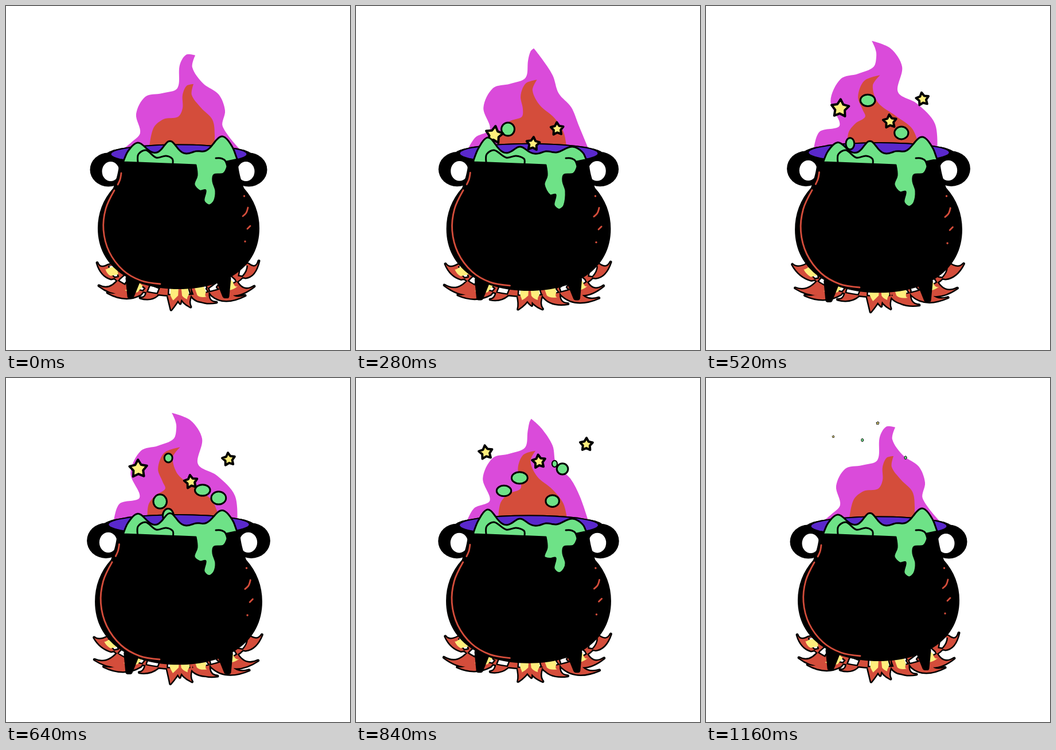
Animation, 600 px wide and 599 px high, one loop 1200 ms. Source, as an HTML page with a canvas:

```html
<!DOCTYPE html>
<html lang="en">
<head>
<meta charset="utf-8">
<title>Bubbling cauldron</title>
<style>
  html, body { margin: 0; width: 100%; height: 100%; overflow: hidden; background: #fff; }
  canvas { display: block; width: 100vw; height: 100vh; }
</style>
</head>
<body>
<canvas id="stage" width="600" height="599"></canvas>
<script>
const ctx = document.getElementById('stage').getContext('2d');
const LOOP = 1200, STEP = 40, CYCLE = 1160;
const MAGENTA = '#da4bda', RED = '#d44d3b', GREEN = '#6ee287';
const PURPLE = '#5a28cc', YELLOW = '#ffee7c', BLACK = '#000';

// Outlines at rest and at full sway, as flat x, y points
const smokeRest = [198,254, 218,238, 234,221, 227,188, 243,158, 272,152, 299,143, 303,103,
  314,85, 330,86, 325,107, 344,135, 371,154, 382,182, 378,210, 412,254];
const smokeSway = [187,254, 197,219, 233,208, 217,165, 235,126, 265,117, 292,105, 297,85,
  294,72, 288,60, 322,73, 342,105, 334,150, 368,170, 400,205, 403,254];
const flameRest = [249,254, 257,213, 275,197, 300,193, 308,178, 308,155, 315,139, 327,136,
  324,155, 340,177, 360,198, 364,225, 362,254];
const flameSway = [247,254, 248,222, 260,205, 277,193, 272,180, 264,158, 275,130, 303,120,
  290,138, 299,168, 330,191, 360,214, 375,254];

// Tips of the fire tongues, from left to right
const fireTips = [[159,447], [162,487], [177,499], [234,508], [288,529], [304,518],
  [322,524], [352,515], [367,516], [417,504], [433,488], [441,444]];

// Particles rise from one point to another; ease > 1 slows them, arc bends the way
const stars = [
  { life: [160, 1170], from: [245, 250], to: [222, 102], ease: 1.5, r: 16, fade: 2 },
  { life: [140, 1180], from: [299, 262], to: [298, 72], ease: .85, arc: 24, r: 12, fade: 6 },
  { life: [120, 1120], from: [329, 256], to: [410, 100], ease: 1.8, r: 11.5, fade: 5 }];
const bubbles = [
  { life: [120, 770], from: [245, 248], to: [281, 112], arc: 16, r: 11.5 },
  { life: [350, 910], from: [338, 256], to: [348, 130], ease: .9, r: 11.5 },
  { life: [480, 970], from: [380, 252], to: [354, 130], ease: 1.1, r: 12 },
  { life: [480, 1180], from: [245, 248], to: [271, 104], arc: 27, r: 12 },
  { life: [580, 1090], from: [295, 252], to: [276, 135], ease: .9, arc: -28, r: 11 },
  { life: [680, 1180], from: [364, 252], to: [350, 134], arc: -20, r: 11 }];

const lerp = (a, b, k) => a + (b - a) * k;
const mix = (a, b, k) => a.map((v, i) => lerp(v, b[i], k));
const pulse = (t, period) => Math.sin(Math.PI * t / period) ** 2;

// Smooth path through flat points; corners stay sharp
function curve(flat, corners = []) {
  const p = [];
  for (let i = 0; i < flat.length; i += 2) p.push([flat[i], flat[i + 1]]);
  const dist = (a, b) => Math.hypot(a[0] - b[0], a[1] - b[1]) || 1;
  const dir = p.map((q, i) => {
    const a = p[i - 1], b = p[i + 1];
    if (!a || !b || corners.includes(i)) return [0, 0];
    const d = dist(a, q) + dist(q, b);
    return [(b[0] - a[0]) / d, (b[1] - a[1]) / d];
  });
  ctx.beginPath();
  ctx.moveTo(...p[0]);
  for (let i = 0; i < p.length - 1; i++) {
    const a = p[i], b = p[i + 1], h = dist(a, b) / 3, u = dir[i], v = dir[i + 1];
    ctx.bezierCurveTo(a[0] + u[0] * h, a[1] + u[1] * h, b[0] - v[0] * h, b[1] - v[1] * h, b[0], b[1]);
  }
}

function fill(color) {
  ctx.fillStyle = color;
  ctx.fill();
}

function stroke(color, width) {
  ctx.strokeStyle = color;
  ctx.lineWidth = width;
  ctx.stroke();
}

function oval(x, y, rx, ry, color) {
  ctx.beginPath();
  ctx.ellipse(x, y, rx, ry, 0, 0, Math.PI * 2);
  fill(color);
}

// Hooked tongues growing out of an ellipse below the pot
function drawFire(t, sway) {
  const cx = 300, cy = 452, rx = 122, ry = 52;
  const tongues = fireTips.map(([x, y], i) => {
    const flick = 2.5 * Math.sin(4 * Math.PI * t / CYCLE + i * 2) - 2.5 * Math.sin(i * 2);
    const tip = [x + (x - cx) * .05 * sway + flick, y + 4 * sway + flick * .6];
    const angle = lerp(Math.atan2((y - cy) / ry, (x - cx) / rx) + (y < cy && x < cx ? 2 * Math.PI : 0), Math.PI / 2, .18);
    const out = [Math.cos(angle), Math.sin(angle)];
    const root = [cx + rx * out[0], cy + ry * out[1]];
    return { tip, out, root, len: Math.hypot(tip[0] - root[0], tip[1] - root[1]) };
  });
  const trace = ({ tip, out, root, len }, size) => {
    const end = mix(root, tip, size), w = Math.min(16, len * .45) * Math.sqrt(size);
    const side = [-out[1] * w, out[0] * w], reach = len * size * .6;
    const bend = [root[0] + out[0] * reach, root[1] + out[1] * reach];
    ctx.moveTo(root[0] - out[0] * 14 + side[0], root[1] - out[1] * 14 + side[1]);
    ctx.lineTo(root[0] + side[0], root[1] + side[1]);
    ctx.quadraticCurveTo(bend[0] + side[0] * .6, bend[1] + side[1] * .6, ...end);
    ctx.quadraticCurveTo(bend[0] - side[0] * .3, bend[1] - side[1] * .3, root[0] - side[0], root[1] - side[1]);
    ctx.lineTo(root[0] - out[0] * 14 - side[0], root[1] - out[1] * 14 - side[1]);
    ctx.closePath();
  };
  ctx.beginPath();
  ctx.ellipse(cx, cy + 2 * sway, rx, ry, 0, 0, Math.PI);
  for (const one of tongues) trace(one, 1);
  stroke(BLACK, 5);
  fill(RED);
  ctx.beginPath();
  tongues.forEach((one, i) => i % 2 || trace(one, .35));
  fill(YELLOW);
}

function drawPot() {
  for (const side of [-1, 1]) {
    oval(301 + side * 122.5, 285, 32, 29.5, BLACK);
    oval(300.5 + side * 118, 288, 15, 17, '#fff');
    const x = 300.5 + side * 80;
    ctx.beginPath();
    ctx.moveTo(x - side * 10, 478);
    ctx.lineTo(x + side * 8, 474);
    ctx.lineTo(x + side * 5, 505);
    ctx.lineTo(x + side, 505);
    ctx.closePath();
    stroke(BLACK, 8);
    fill(BLACK);
  }
  oval(301.5, 259, 127, 18.5, BLACK);
  fill(BLACK);
  ctx.fill(new Path2D('M200 262L197 278C195 295 191 305 187 317C169 337 160 361 160 387' +
    'C160 455 220 493 301 493C383 493 442 455 442 387C442 361 433 337 415 317C411 305 407 295 405 278L402 262Z'));
  oval(301.5, 258, 118, 15.5, PURPLE);

  const marks = [
    [201,291, 199,302, 195,311],
    [189,321, 174,353, 170,390, 180,428, 204,460, 235,478, 269,484],
    [422,351, 419,360, 413,366],
    [426,383, 421,388]];
  for (const mark of marks) {
    curve(mark);
    stroke(RED, 2.8);
  }
  oval(415.5, 331, 1.7, 1.7, RED);
  oval(417, 410, 1.7, 1.7, RED);
}

// The surface is a sum of bumps that rise and sink
function drawSlime(t) {
  const swell = pulse(Math.min(t, 1120), 560);
  const drip = 347 + 7.5 * Math.sin(2 * Math.PI * t / CYCLE);
  const bump = (x, mid, width, height) => height * Math.exp(-(((x - mid) / width) ** 2));
  const edge = [];
  for (let x = 205; x <= 403; x += 6) {
    const y = 258 - bump(x, 230, 18, lerp(20, 29, swell)) - bump(x, 286, 15, lerp(23, 13, swell ** 2))
      - bump(x, 333, 12, 5) - bump(x, 377, 21, lerp(31, 13, swell));
    edge.push(x, y + 15 * Math.abs((x - 304) / 99) ** 20);
  }
  const n = edge.length / 2;
  curve([...edge, 404,267, 385,271, 386,280, 379,292, 363,294, 361,305, 366,322,
    363, drip - 7, 354, drip, 345, drip - 8, 348, drip - 26, 338, drip - 25,
    328,311, 333,295, 331,277, 280,275, 205,272], [n, n + 1, n + 14]);
  ctx.closePath();
  fill(GREEN);
  stroke(BLACK, 3);

  const lean = 3 * swell;
  curve([230 - lean,272, 231 - lean,258, 244 - lean,251, 262,264, 279,261, 290 + lean,266, 291 + lean,274]);
  stroke(BLACK, 3);
  curve([366,265, 374,265, 382,269, 386,279]);
  stroke(BLACK, 3);
}

function particle({ life, from, to, ease = 1, arc = 0, r, fade = 2.6 }, t) {
  const k = (t - life[0]) / (life[1] - life[0]);
  if (k <= 0 || k >= 1) return null;
  const [x, y] = mix(from, to, 1 - (1 - k) ** ease);
  return { k, x: x + arc * Math.sin(Math.PI * k), y, r: r * Math.min(1, .5 + 4 * k, .12 + fade * (1 - k)) };
}

function drawBubble({ k, x, y, r }) {
  const squash = -.16 * Math.cos(2 * Math.PI * k);
  oval(x, y, r * (1 + squash), r * (1 - squash), GREEN);
  stroke(BLACK, Math.min(3, r * .4));
}

function drawStar({ x, y, r }, turn) {
  ctx.beginPath();
  for (let i = 0; i < 10; i++) {
    const a = turn - Math.PI / 2 + i * Math.PI / 5, d = i % 2 ? r * .55 : r;
    ctx.lineTo(x + Math.cos(a) * d, y + Math.sin(a) * d);
  }
  ctx.closePath();
  fill(YELLOW);
  stroke(BLACK, Math.min(4, r * .35));
}

function drawParticles(t) {
  for (const b of bubbles) {
    const p = particle(b, t);
    if (p) drawBubble(p);
  }
  stars.forEach((s, i) => {
    const p = particle(s, t);
    if (p) drawStar(p, .15 * Math.sin(t / 190 + i));
  });
}

function draw(t) {
  const sway = pulse(t, CYCLE);
  ctx.fillStyle = '#fff';
  ctx.fillRect(0, 0, 600, 599);
  ctx.lineJoin = ctx.lineCap = 'round';

  curve(mix(smokeRest, smokeSway, sway), [9]);
  fill(MAGENTA);
  curve(mix(flameRest, flameSway, sway), [7]);
  fill(RED);
  drawFire(t, sway);

  ctx.save();
  ctx.translate(301, 330);
  ctx.scale(1 + .036 * sway, 1 + .04 * sway);
  ctx.translate(-301, -330);
  drawPot();
  ctx.restore();

  drawParticles(t);
  drawSlime(t);
}

const start = performance.now();
function tick() {
  const t = (performance.now() - start) % LOOP;
  draw(Math.min(Math.floor(t / STEP) * STEP, CYCLE));
  requestAnimationFrame(tick);
}
tick();
</script>
</body>
</html>
```
